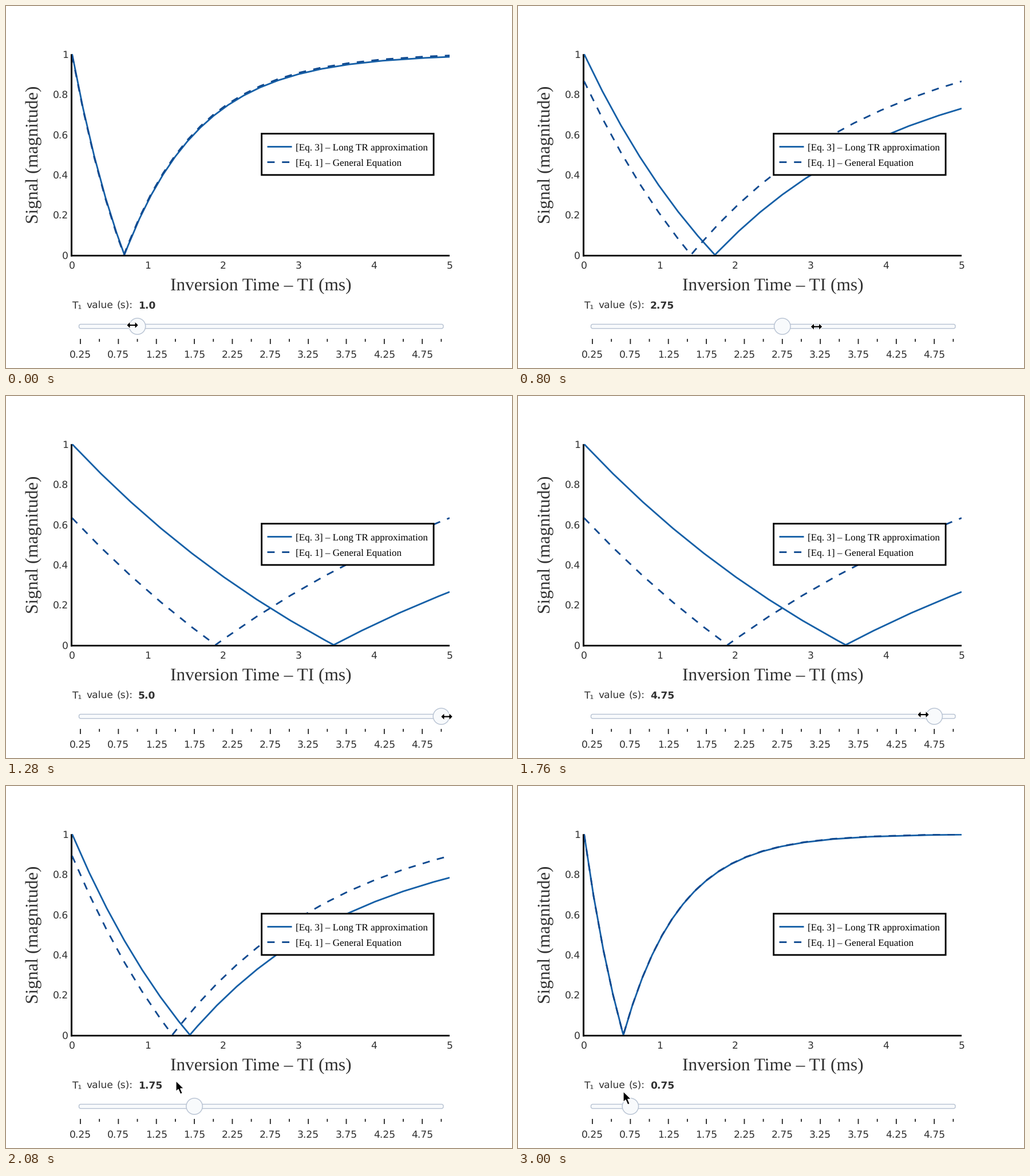
A matplotlib script for the animation above (3.04 s loop, 884 by 634 pixels).

```python
import matplotlib.pyplot as plt
import numpy as np
from matplotlib.animation import FuncAnimation
from matplotlib.patches import Circle, FancyBboxPatch, Polygon, Rectangle

plt.rcParams["text.hinting"] = "none"

W, H, DPI = 884, 634, 100
PT = 72 / DPI                       # points per pixel
S = 1.4286                          # page zoom
FRAMES, STEP = 76, 40
X0, X1, Y0, Y1 = 115.5, 775, 436, 84.3
RAIL_X, RAIL_DX, RAIL_Y = 130, 33.18, 561
TR = 5.0
SOLID, DASHED = "#1660a7", "#104a90"
INK, RAIL_EDGE, RAIL_FILL, PRESSED = "#303030", "#b8c3d3", "#f8fafc", "#d3d5d8"
DASH = (0, (4.5, 4.5))

fig = plt.figure(figsize=(W / DPI, H / DPI), dpi=DPI, facecolor="white")
ax = fig.add_axes([0, 0, 1, 1])
ax.set(xlim=(0, W), ylim=(H, 0))
ax.axis("off")


def text(x, y, s, px=12 * S, ha="center", font="DejaVu Sans", color=INK, **kw):
    return ax.text(x, y, s, fontsize=px * PT, ha=ha, va="baseline",
                   family=font, color=color, **kw)


def box(x, y, x2, y2, color):
    ax.add_patch(Rectangle((x, y), x2 - x, y2 - y, fc=color, lw=0, snap=False))


def stroke(xs, ys, color, dash="-", z=3):
    return ax.plot(xs, ys, color=color, lw=2 * S * PT, ls=dash, zorder=z,
                   solid_capstyle="butt", dash_capstyle="butt",
                   solid_joinstyle="bevel", dash_joinstyle="bevel")[0]


# Axes
box(113, Y1, 116, 438.6, "black")
box(113, 435.8, X1, 438.6, "black")
for k in range(6):
    text(X0 + (X1 - X0) * k / 5, 460, str(k))
    text(108.7, Y0 + (Y1 - Y0) * k / 5 + 6.3, f"{k / 5:g}", ha="right")
text(445, 498, "Inversion Time – TI (ms)", 22 * S, font="Liberation Serif")
text(56, 260, "Signal (magnitude)", 22 * S, font="Liberation Serif",
     rotation=90, rotation_mode="anchor")

# Curves
area = Rectangle((X0 - 0.5, Y1 - 0.5), X1 - X0 + 0.5, Y0 - Y1 + 0.7,
                 transform=ax.transData)
approx, general = stroke([], [], SOLID), stroke([], [], DASHED, DASH)
for line in (approx, general):
    line.set_clip_path(area)

# Legend
ax.add_patch(Rectangle((446.6, 223.6), 300.5, 72.3, fc="white", ec="black",
                       lw=2 * S * PT, zorder=5, joinstyle="miter", snap=False))
entries = [(246.3, SOLID, "-", "[Eq. 3] – Long TR approximation"),
           (273.3, DASHED, DASH, "[Eq. 1] – General Equation")]
for y, color, dash, name in entries:
    stroke([455.5, 498.5], [y, y], color, dash, 6)
    text(505.5, y + 7.3, name, ha="left", font="Liberation Serif",
         color="black", zorder=6)

# Slider
for x, word in [(115.5, "T₁"), (140, "value"), (194, "(s):")]:
    text(x, 530, word, ha="left")
readout = text(231, 530, "", ha="left", weight="bold")
ax.add_patch(FancyBboxPatch((127.5, 557.4), 636.5, 7.4, fc=RAIL_FILL, ec=RAIL_EDGE,
                            boxstyle="round,pad=0,rounding_size=3",
                            lw=S * PT, zorder=4))
for k in range(20):
    x = RAIL_X + RAIL_DX * k
    major = k % 2 == 0
    box(x - 0.9, 583, x + 0.9, 592 if major else 588, "#222222")
    if major:
        text(x, 616, f"{0.25 * (k + 1):.2f}")
grip = ax.add_patch(Circle((0, RAIL_Y), 14.2, ec=RAIL_EDGE, lw=S * PT, zorder=5))

# Mouse pointers
half = np.array([(4, -1.7), (4, -6.5), (10.5, 0), (4, 6.5), (4, 1.7)])
RESIZE = np.vstack([half, -half])
ARROW = np.array([(0, 0), (0, 18.5), (4.1, 14.7), (7.7, 23), (11.2, 21.5),
                  (7.7, 13.4), (13.6, 13.4)])
mouse = ax.add_patch(Polygon(RESIZE, fc="black", ec="white", lw=1.2 * PT, zorder=9))

# Drag right, rest, drag back left, rest
PATH_X = [(0, 221), (11, 224), (13, 240), (15, 309), (26, 718), (32, 770),
          (40, 770), (44, 708), (52, 297), (56, 210), (61, 187), (75, 184)]
PATH_Y = [(0, 559), (26, 562), (44, 558), (52, 516.5), (61, 534.5), (75, 535)]


def glide(path, i):
    """Smooth monotone path through the key points."""
    t, p = np.array(path, float).T
    i = np.clip(i, t[0], t[-1])
    sec = np.diff(p) / np.diff(t)
    a, b = sec[:-1], sec[1:]
    inner = np.where(a * b > 0, 2 * a * b / np.where(a + b == 0, 1, a + b), 0)
    m = np.concatenate([[0], inner, [0]])
    k = min(np.searchsorted(t, i, "right") - 1, len(t) - 2)
    h = t[k + 1] - t[k]
    u = (i - t[k]) / h
    ease = u * u * (3 - 2 * u)
    return (p[k] + (p[k + 1] - p[k]) * ease
            + h * u * (1 - u) * (m[k] * (1 - u) - m[k + 1] * u))


def slider(i):
    """Slider value; it trails the mouse by one tick."""
    k = np.clip(np.round((glide(PATH_X, i - 1) - RAIL_X) / RAIL_DX), 0, 19)
    return 0.25 * (float(k) + 1)


def curve(t1, offset=0):
    """Signal as a polyline with an even sag of about a third of a pixel."""
    ti = np.linspace(0, 5, 2001)
    decay = 2 * np.exp(-ti / t1)
    x = X0 + (X1 - X0) * ti / 5
    tau = t1 * (X1 - X0) / 5
    slope = (Y0 - Y1) * decay / tau
    bend = np.sqrt(slope / tau / np.hypot(1, slope))
    turn = np.cumsum(bend) * (x[1] - x[0])
    signal = np.abs(1 + offset - decay)
    marks = np.searchsorted(turn, np.arange(0, turn[-1], np.sqrt(8 * 0.35)))
    keep = np.unique([*marks, signal.argmin(), len(ti) - 1])
    return x[keep], (Y0 + (Y1 - Y0) * signal)[keep]


def draw(i):
    value, t1 = slider(i), slider(i - 1)    # curves trail the slider
    approx.set_data(*curve(t1))
    general.set_data(*curve(t1, np.exp(-TR / t1)))
    readout.set_text(str(value))
    grip.center = RAIL_X + RAIL_DX * (value / 0.25 - 1), RAIL_Y
    grip.set_facecolor(PRESSED if 11 <= i <= 15 else RAIL_FILL)
    x, y = glide(PATH_X, i), glide(PATH_Y, i)
    mouse.set_xy((RESIZE if y > 545 else ARROW) + (x, y))
    return approx, general, readout, grip, mouse


anim = FuncAnimation(fig, draw, frames=FRAMES, interval=STEP, repeat=True,
                     repeat_delay=0, blit=False)
plt.show()
```
